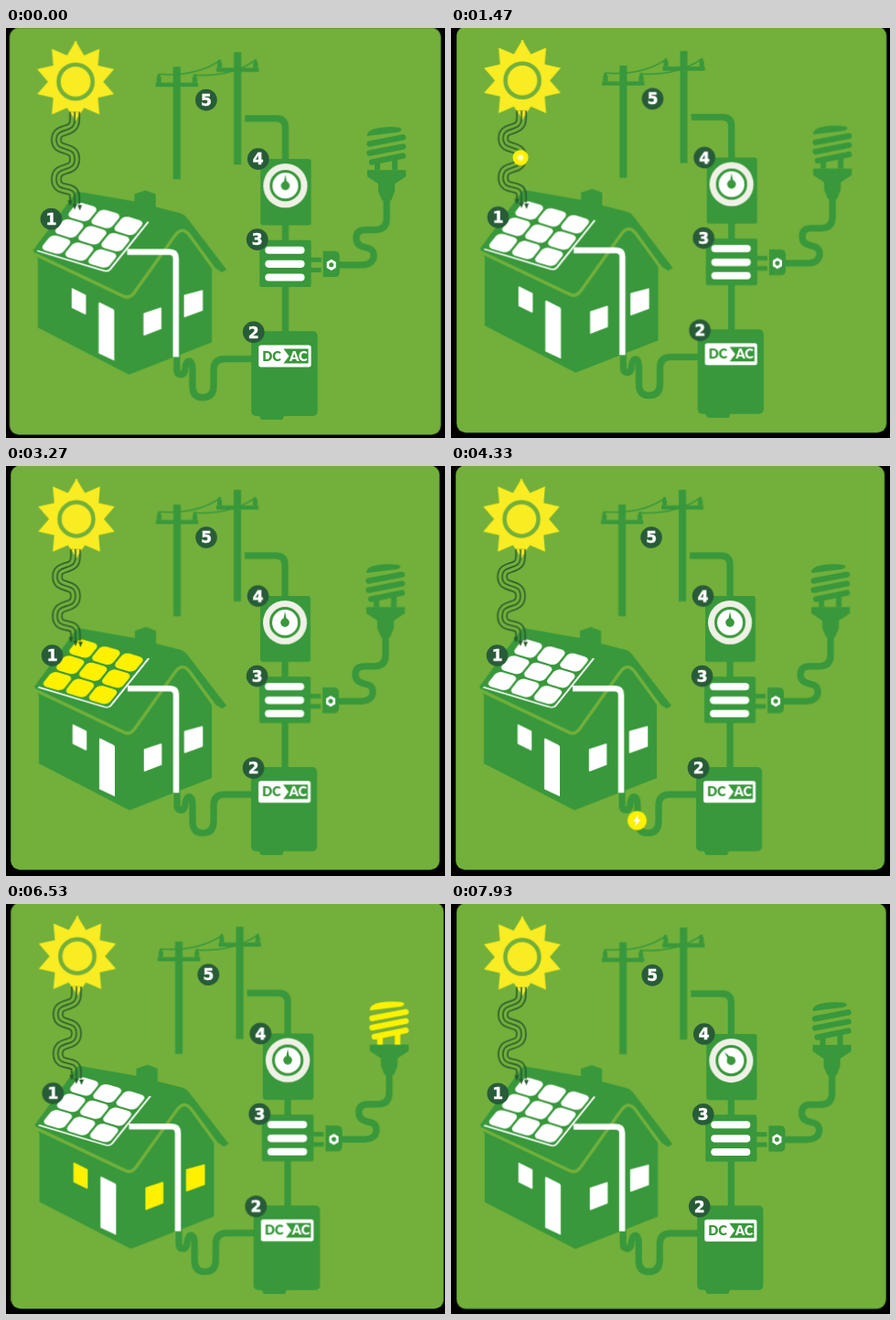
These frames come from a looping animation (480 px wide and 448 px high, 8000 ms). An HTML page without scripts:

```html
<!DOCTYPE html>
<html lang="en">
<head>
<meta charset="utf-8">
<title>Solar power at home</title>
<style>
  :root { --green: #38983b; --deep: #285c38; --lit: #fff100; --T: 8s linear infinite; }
  html, body { margin: 0; width: 100%; height: 100%; overflow: hidden; background: #000; }
  svg { display: block; width: 480px; height: 448px; }
  .g { fill: var(--green); }
  .line { fill: none; stroke: var(--green); stroke-width: 7.2; }
  .badge circle { fill: var(--deep); }
  .badge text { fill: #fff; stroke: #fff; stroke-width: .5; font: bold 17px "DejaVu Sans", sans-serif; text-anchor: middle; }
  .label { font: 900 14.5px Lato, "Open Sans", sans-serif; }

  .scene { animation: drift var(--T); }
  @keyframes drift {
    0%, 5.875% { transform: translate(-1.4px, .2px) scale(1.006, 1.0065); }
    10%, 18.375% { transform: translate(.8px, -1px) scale(1.003, 1.004); }
    25% { transform: translate(.5px, -.5px) scale(1.002, 1.002); }
    32.5%, 54.125% { transform: none; }
    64.125%, 69.125% { transform: translate(-.5px, -1px) scale(1.006, 1.004); }
    79.125%, 82% { transform: translate(.3px, -1.2px) scale(1.009, 1.005); }
    90.875%, 100% { transform: translate(.7px, -.4px) scale(1.002, 1.003); }
  }

  .use { color: var(--off); fill: currentColor; animation: power 8s step-end infinite; }
  .white { --off: #fff; }
  .bulb { --off: var(--green); }
  @keyframes power {
    0%, 87.5% { color: var(--off); }
    73.75% { color: var(--lit); }
  }
  .cells { fill: #fff; animation: charge 8s step-end infinite; }
  @keyframes charge {
    0%, 45.875% { fill: #fff; }
    37.5% { fill: var(--lit); }
  }

  .spark { fill: var(--lit); opacity: 0; }
  .ray { animation: ray var(--T); }
  @keyframes ray {
    0%, 5.8% { transform: translate(76px, 95px); opacity: 0; }
    5.9% { transform: translate(76px, 95px); opacity: 1; }
    8% { transform: translate(68px, 109px); }
    10%, 15% { transform: translate(58px, 120px); }
    16.5% { transform: translate(67px, 131px); }
    18.375% { transform: translate(75px, 142px); }
    25% { transform: translate(73px, 153px); }
    32.5%, 36.6% { transform: translate(65px, 167.5px); opacity: 1; }
    37.4% { transform: translate(72px, 184px); opacity: 1; }
    37.5%, 100% { transform: translate(72px, 184px); opacity: 0; }
  }
  .current { animation: current var(--T); }
  @keyframes current {
    0%, 46.5% { transform: translate(203.5px, 387.5px); opacity: 0; }
    46.6%, 54.2% { transform: translate(203.5px, 387.5px); opacity: 1; }
    55.6% { transform: translate(215px, 401px); }
    57% { transform: translate(227px, 388px); }
    58.5% { transform: translate(229px, 365px); }
    59% { transform: translate(238px, 359px); }
    61% { transform: translate(290px, 359px) scale(.85); }
    62% { transform: translate(305.5px, 342px) scale(.85); }
    64.125%, 69.125% { transform: translate(305.5px, 304px) scale(.88, .8); opacity: 1; }
    72% { transform: translate(305.5px, 255px) scale(.85); opacity: 1; }
    72.1%, 100% { transform: translate(305.5px, 255px); opacity: 0; }
  }
  .needle { animation: meter var(--T); }
  @keyframes meter {
    0%, 91.625% { transform: rotate(0deg); }
    99.125%, 100% { transform: rotate(-38deg); }
  }
</style>
</head>
<body>
<svg viewBox="0 0 480 448">
  <defs>
    <path id="wave" d="M76 91V99C76 116 56 106 56 121S76 126 76 142S56 148 56 164S76 169 76 183V191" fill="none"/>
    <mask id="triple" maskUnits="userSpaceOnUse" x="40" y="85" width="60" height="115">
      <use href="#wave" stroke="#fff" stroke-width="11.600"/>
      <use href="#wave" stroke="#000" stroke-width="8.400"/>
      <use href="#wave" stroke="#fff" stroke-width="1.600"/>
    </mask>
    <radialGradient id="glow">
      <stop offset=".15" stop-color="#fffde0"/>
      <stop offset=".55" stop-color="#fff100"/>
    </radialGradient>
    <path id="rays" d="M-1-44H0L9.300-28.500 25.900-35.600 24.300-17.600 41.800-13.600 30 0 41.800 13.600 24.300 17.600 25.900 35.600 9.300 28.500 0 42H-1z"/>
    <path id="tip" d="M-2.500-2H2.500L0 4z"/>
    <g id="row">
      <rect id="cell" x=".5" y=".5" width="9" height="9" rx="2.300"/>
      <use href="#cell" x="10"/>
      <use href="#cell" x="20"/>
    </g>
    <g id="pole">
      <path d="M-4-17H4V105H-4zM-23 0H23V4.500H-23z"/>
      <path d="M-21-9h3v3h1v6h-5v-6h1zM18-9h3v3h1v6h-5v-6h1z"/>
    </g>
  </defs>

  <g class="scene">
    <rect x="5.200" y="-.5" width="468.800" height="441.800" rx="10" fill="#72b03b"/>

    <!-- Sun -->
    <g transform="translate(77 58)" fill="#f9ec22">
      <use href="#rays"/>
      <use href="#rays" transform="scale(-1 1)"/>
      <circle r="18.500" stroke="#72b03b" stroke-width="4.500"/>
    </g>

    <!-- Power lines -->
    <g class="g">
      <use href="#pole" x="187" y="59"/>
      <use href="#pole" x="253" y="43"/>
      <path d="M167 50Q208 53 234 35M206 51Q246 53 272 35" fill="none" stroke="#38983b" stroke-width="1.500"/>
    </g>

    <!-- House -->
    <path class="g" d="M78 177L141 188V180L153 176 164 180V194L191 201Q195 202 198 206L241 262 236 265 225 258V341L135 376 36 325V251L31 241z"/>
    <path d="M32 245L129 291Q135 294 140 288L185 225Q193 214 201 225L228 262" fill="none" stroke="#72b03b" stroke-width="3.500"/>
    <g transform="matrix(2.500 .75 -1.420 1.770 79 187)">
      <path d="M0 30.800H29Q30.800 30.800 30.800 29V0" fill="none" stroke="#fff" stroke-width=".8"/>
      <g class="cells">
        <use href="#row"/>
        <use href="#row" y="10"/>
        <use href="#row" y="20"/>
      </g>
    </g>
    <path d="M102 299Q102 297 104 298L118 305Q119 306 119 307V361L102 353z" fill="#fff"/>
    <path class="use white" stroke="currentColor" stroke-width="1.500" stroke-linejoin="round" d="M73.500 283L87.500 290V310L73.500 303zM151.500 310L169.500 304V326L151.500 333zM195.500 290L214.500 285V306L195.500 313z"/>

    <!-- Sunlight -->
    <rect x="40" y="85" width="60" height="115" fill="#285c2c" mask="url(#triple)"/>
    <g fill="#285c2c">
      <use href="#tip" x="71" y="189"/>
      <use href="#tip" x="76" y="193"/>
      <use href="#tip" x="81.500" y="194"/>
    </g>

    <!-- Wiring -->
    <g class="line">
      <path d="M187 354V371Q187 376 192 376Q196 375 196 369Q197 361 201 361.500Q204 363 204 370V388Q204 401 215 401Q227 401 227 388V371Q227 359 239 359H270"/>
      <path d="M261 98H295Q305 98 305 108V335"/>
      <path d="M362 257H389Q402 256 401 245Q400 239 392 238Q382 236 382 228Q382 219 392 219H402Q415 219 415 207V180"/>
    </g>
    <path d="M133 243H179Q186 243 186 250V357" fill="none" stroke="#fff" stroke-width="6.500"/>

    <g class="spark ray"><circle r="8.500" fill="url(#glow)"/></g>
    <g class="spark current">
      <circle r="10.500"/>
      <path d="M1-6L-4 1H-1L-2 6 4-1H1z" fill="#fff"/>
    </g>

    <!-- Meter -->
    <rect class="g" x="278" y="142" width="55" height="72" rx="3"/>
    <g transform="translate(305 171)">
      <circle r="24" fill="#eff1e6"/>
      <circle r="15.500" fill="#fff" stroke="#38983b" stroke-width="3"/>
      <g class="needle g">
        <circle r="4.800"/>
        <path d="M-2-2L0-12 2-2z"/>
      </g>
    </g>

    <!-- Breaker panel and plug -->
    <path class="g" d="M279 230H331Q333 230 333 232V249H344V254H333V260H344V265H333V279Q333 281 331 281H279Q277 281 277 279V232Q277 230 279 230zM346 242H359Q364 242 364 248V264Q364 270 359 270H346z"/>
    <path d="M287 241H322M287 256H322M287 270.500H322" stroke="#fff" stroke-width="8" stroke-linecap="round"/>
    <path d="M355 251L360 254V260L355 263 350 260V254z" fill="#fff"/>
    <circle class="g" cx="355" cy="257" r="2.500"/>

    <!-- Lamp -->
    <path class="g" d="M394 154H436V161L424 169V177L420 187H410L406 177V169L394 161z"/>
    <g class="use bulb">
      <path d="M402 143H408V154H402zM421 141H427V154H421z"/>
      <path d="M394 117Q393 109 412 107.500Q428 106.500 431 109Q432 112 426 113z"/>
      <path d="M396.500 125.500L433 118.500M396.500 135.500L433 128.500M399 145.500L433 138.500" stroke="currentColor" stroke-width="6.300" stroke-linecap="round"/>
    </g>

    <!-- Inverter -->
    <rect class="g" x="268" y="329" width="72" height="92" rx="5"/>
    <path class="g" d="M276 420H304L302 425H279z"/>
    <rect x="276" y="344" width="57" height="24" rx="2.500" fill="#fff"/>
    <path class="g" d="M303 348H330V364H303L309 356z"/>
    <text class="label g" x="280" y="361">DC</text>
    <text class="label" x="309.500" y="361" fill="#fff">AC</text>

    <!-- Steps -->
    <g class="badge">
      <g transform="translate(50.500 207)"><circle r="11.800"/><text y="6.200">1</text></g>
      <g transform="translate(270.500 330)"><circle r="11.800"/><text y="6.200">2</text></g>
      <g transform="translate(274.500 229.500)"><circle r="11.800"/><text y="6.200">3</text></g>
      <g transform="translate(275.500 142)"><circle r="11.800"/><text y="6.200">4</text></g>
      <g transform="translate(219 78)"><circle r="11.800"/><text y="6.200">5</text></g>
    </g>
  </g>
</svg>
</body>
</html>
```
